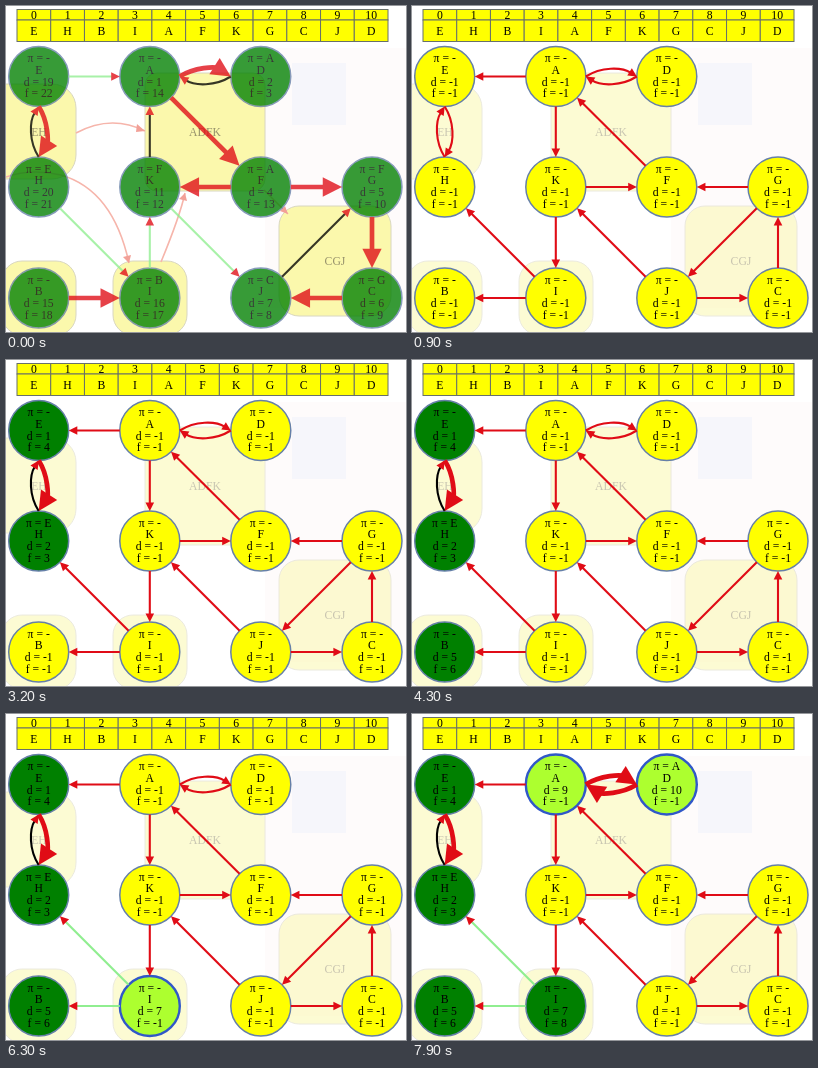
Write an HTML page that moves like this. It is 400 px wide and 326 px high and loops after 8000 ms.

```html
<!DOCTYPE html>
<html lang="en">
<head>
<meta charset="utf-8">
<title>Depth-first search on a directed graph</title>
<style>
  html, body { margin: 0; width: 100%; height: 100%; overflow: hidden; background: #fff; }
  svg { display: block; width: 100vw; height: 100vh; }
  text { font: 11.7px "Liberation Serif", "Times New Roman", serif; text-anchor: middle; }
</style>
</head>
<body>
<svg viewBox="0 0 400 326">
  <g id="page"></g>
  <g id="regions"></g>
  <g id="links"></g>
  <g id="table"></g>
  <g id="finished"></g>
  <g id="search"></g>
</svg>
<script>
const LOOP = 8000, R = 30, RED = "#e00c16";
const COLS = [32.7, 143.8, 254.8, 366], ROWS = [70.5, 181, 292];
const GRID = ["EAD ", "HKFG", "BIJC"];
const ORDER = "EHBIAFKGCJD";

const nodes = {};
GRID.forEach((row, j) => [...row].forEach((id, i) => {
  if (id !== " ") nodes[id] = { x: COLS[i], y: ROWS[j] };
}));

const EDGES = "AE AK AD DA EH HE KF FA GF GJ CG JC JK KI IH IB".split(" ");
const REVERSED = EDGES.map(e => e[1] + e[0]);

// Tokens: "A:d1" discovery, "A:f2" finish, "A:pB" parent, "AB:kind" edge.
const DONE = "A:d1 A:f14 D:pA D:d2 D:f3 F:pA F:d4 F:f13 G:pF G:d5 G:f10 C:pG C:d6 C:f9 " +
  "J:pC J:d7 J:f8 K:pF K:d11 K:f12 B:d15 B:f18 I:pB I:d16 I:f17 E:d19 E:f22 H:pE H:d20 H:f21 " +
  "AD:tree AF:tree FK:tree FG:tree GC:tree CJ:tree BI:tree EH:tree " +
  "DA:back HE:back KA:back JG:back EA:cross KJ:cross IK:cross HI:cross";

const STEPS = [
  [1000, "E:d1"],
  [1600, "EH:tree H:pE H:d2 HE:tree"],
  [2200, "HE:back H:f3"],
  [2800, "E:f4"],
  [3400, "B:d5"],
  [4000, "B:f6"],
  [4600, "I:d7"],
  [5300, "IB:cross"],
  [5800, "IH:cross"],
  [6400, "I:f8"],
  [7000, "A:d9"],
  [7600, "AD:tree D:pA D:d10 DA:tree"],
];

const KINDS = {
  plain: [RED, 2.1],
  tree: [RED, 4.7],
  back: ["#000", 2.1],
  cross: ["#90ee90", 2.1],
};

const layer = id => document.getElementById(id);
const clamp = v => Math.max(0, Math.min(1, v));

const text = (x, y, s, extra = "") => `<text x="${x}" y="${y}" ${extra}>${s}</text>`;

const rect = (x, y, w, h, fill, extra = "") =>
  `<rect x="${x}" y="${y}" width="${w}" height="${h}" fill="${fill}" ${extra}/>`;

function parse(tokens) {
  const state = { edge: {} };
  for (const token of tokens.split(" ").filter(Boolean)) {
    const [id, value] = token.split(":");
    if (id.length === 2) state.edge[id] = value;
    else (state[id] ||= {})[value[0]] = value.slice(1);
  }
  return state;
}

function arrow(id, kind, paired) {
  const [color, width] = KINDS[kind];
  const a = nodes[id[0]], b = nodes[id[1]];
  const len = Math.hypot(b.x - a.x, b.y - a.y);
  const ux = (b.x - a.x) / len, uy = (b.y - a.y) / len;
  const bend = paired ? 9.7 : 0;
  const span = len - 2 * R;
  // Point at a share of the visible span, shifted sideways.
  const at = (share, side) => [
    a.x + ux * (R + span * share) + uy * side,
    a.y + uy * (R + span * share) - ux * side,
  ];
  const c1 = at(.3, bend), c2 = at(.7, bend), end = at(1, 0);
  const angle = Math.atan2(end[1] - c2[1], end[0] - c2[0]);
  const head = width * 4.1;
  const neck = [end[0] - Math.cos(angle) * head * .8, end[1] - Math.sin(angle) * head * .8];
  const body = paired ? `C${c1} ${c2} ${neck}` : `L${neck}`;
  return `<path d="M${at(0, 0)}${body}" fill="none" stroke="${color}" stroke-width="${width}"/>` +
    `<path d="M0,0L${-head},${-head / 2}V${head / 2}Z" fill="${RED}" ` +
    `transform="translate(${end}) rotate(${angle * 180 / Math.PI})"/>`;
}

function disc(id, { d = "-1", f = "-1", p = "-" } = {}) {
  const { x, y } = nodes[id];
  const open = d !== "-1" && f === "-1";
  const fill = f !== "-1" ? "#008000" : open ? "#adff2f" : "#ffff00";
  const stroke = open ? 'stroke="#3058c8" stroke-width="2.4"' : 'stroke="#6680a8" stroke-width="1.5"';
  const lines = [`π = ${p}`, id, `d = ${d}`, `f = ${f}`];
  return `<circle cx="${x}" cy="${y}" r="${R}" fill="${fill}" ${stroke}/>` +
    lines.map((s, i) => text(x, y - 14.5 + i * 11.8, s)).join("");
}

function table() {
  const x0 = 11, w = 371 / ORDER.length, line = 'stroke="#68706a"';
  return [...ORDER].map((id, i) => {
    const x = x0 + i * w, mid = x + w / 2;
    return rect(x, 3.5, w, 10.5, "#ffff00", line) + rect(x, 14, w, 21.5, "#ffff00", line) +
      text(mid, 12.8, i) + text(mid, 29, id);
  }).join("");
}

function regions() {
  const box = (x, y, w, h, r) => rect(x, y, w, h, "#fbf8ac", `rx="${r}" stroke="#d8d6c0"`);
  const label = (x, y, s) => text(x, y, s, 'fill="#98936c"');
  return box(-40, 78, 110, 95, 24) + box(139, 67, 120, 118, 12) + box(273, 200, 112, 110, 20) +
    box(-4, 255, 74, 74, 20) + box(107, 255, 74, 74, 20) +
    label(33, 130, "EH") + label(199, 130, "ADFK") + label(329, 259, "CGJ");
}

function links() {
  const curves = ["M70,127Q105,108 139,125", "M0,171Q25,162 55,169Q107,184 123,257",
    "M155,256Q174,210 179,187", "M258,184L282,208"];
  return `<g fill="none" stroke="#f6b5ab" stroke-width="1.6">${curves.map(d => `<path d="${d}"/>`).join("")}</g>` +
    `<path d="M139,125l-8,-7l-1,8zM123,257l-6,-6l8,-2zM179,187l-6,6l8,2zM282,208l-8,-3l5,-5z" fill="#f2a097"/>`;
}

function graph(edges, tokens) {
  const state = parse(tokens);
  const kind = id => state.edge[id] || "plain";
  const drawn = [...edges].sort((a, b) => (kind(a) === "tree") - (kind(b) === "tree"));
  return Object.keys(nodes).map(id => disc(id, state[id])).join("") +
    drawn.map(id => arrow(id, kind(id), edges.includes(id[1] + id[0]))).join("");
}

layer("page").innerHTML = rect(259, 42, 141, 260, "#fefbfb") + rect(286, 57, 54, 62, "#f6f6fb");
layer("regions").innerHTML = regions();
layer("links").innerHTML = links();
layer("table").innerHTML = table();
layer("finished").innerHTML = graph(REVERSED, DONE);

const fade = (id, value) => layer(id).setAttribute("opacity", clamp(value));

let shown = -1;
function show(t) {
  const count = STEPS.filter(([at]) => at <= t).length;
  if (count !== shown) {
    shown = count;
    layer("search").innerHTML = graph(EDGES, STEPS.slice(0, count).map(s => s[1]).join(" "));
  }
  // The finished graph is already fading when the loop begins.
  fade("finished", .78 - t / 900);
  fade("search", t / 850);
  fade("links", 1 - t / 700);
  fade("regions", 1 - .48 * clamp(t / 850));
}

const start = performance.now();
function tick() {
  show((performance.now() - start) % LOOP);
  requestAnimationFrame(tick);
}
tick();
</script>
</body>
</html>
```
